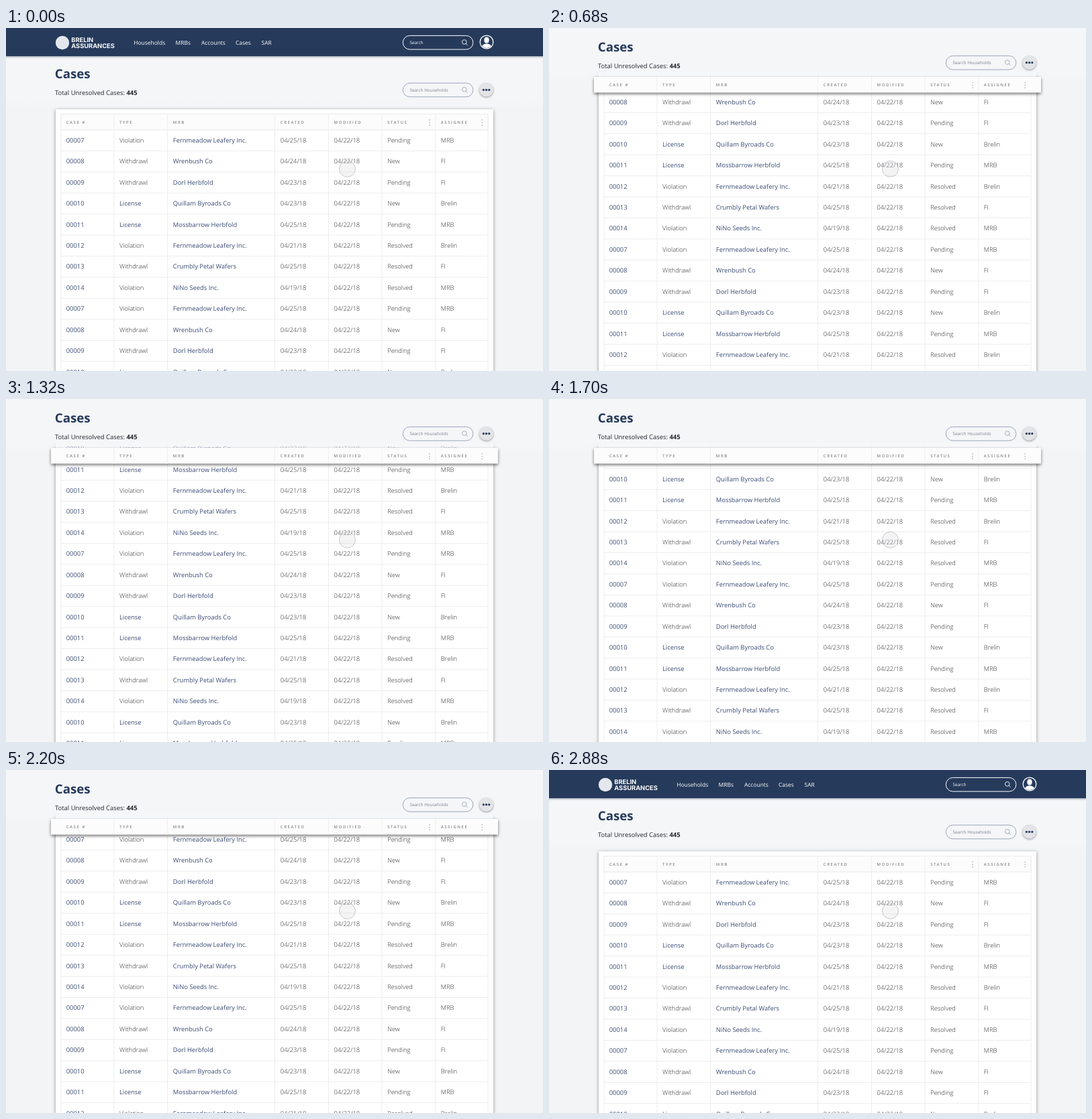
An HTML page that plays this animation: 800 by 512 pixels, repeating every 2900 ms.

```html
<!DOCTYPE html>
<html lang="en">
<head>
<meta charset="utf-8">
<title>Cases</title>
<style>
  html, body { margin: 0; width: 100%; height: 100%; overflow: hidden; background: #f2f4f6; }
  svg { display: block; width: 800px; height: 512px; }
  text { font-family: "Open Sans", "Noto Sans", sans-serif; text-rendering: geometricPrecision; white-space: pre; }
  .link { font-size: 9.4px; fill: #3a4c74; }
  .cell { font-size: 9.4px; font-weight: 300; fill: #26272c; }
  .head { font-size: 6px; font-weight: 600; letter-spacing: 1.55px; fill: #85878d; }
  .menu { font-size: 8.45px; fill: #fff; }
  .hint { font-size: 6.4px; }
  .brand { font: 700 9.3px Inter, sans-serif; fill: #fff; }
  .title { font-size: 18.7px; font-weight: 700; fill: #263a5b; }
  .total { font-size: 9.43px; fill: #25272e; }
  .card { filter: drop-shadow(0 1px 2.5px rgba(0, 0, 0, .42)); }
  .bar { filter: drop-shadow(0 1px 1.5px rgba(30, 45, 75, .5)); }
  .knob { filter: drop-shadow(0 1px 1.5px rgba(0, 0, 0, .4)); }
</style>
</head>
<body>
<svg viewBox="0 0 800 512" xmlns="http://www.w3.org/2000/svg">
  <defs>
    <linearGradient id="fade" x1="0" y1="0" x2="0" y2="1">
      <stop offset="0" stop-color="#f4f6f8"/>
      <stop offset="1" stop-color="#f4f6f8" stop-opacity="0"/>
    </linearGradient>
    <clipPath id="face"><circle cx="716" cy="21" r="9"/></clipPath>
  </defs>
  <rect width="800" height="512" fill="#f2f4f6"/>
  <g id="table"></g>
  <g id="top"></g>
  <g id="header"></g>
  <g id="nav"></g>
  <circle cx="508.5" cy="210.3" r="12" fill="#d8d8dc" fill-opacity=".28" stroke="#8f9096" stroke-opacity=".45"/>
</svg>
<script>
const LOOP = 2900, STEP = 20;
const ROW_H = 31.43, ROWS_TOP = 152, HEAD_TOP = 128.5, HEAD_H = 23.5;
const STICK = 55.5;      // scroll at which the column header sticks
const COLLAPSE = 42;     // scroll at which the page top stops moving

const EDGES = [82, 161, 240.5, 400.5, 480.5, 560, 640, 718];
const TEXT_X = [89.7, 169, 248.8, 408.8, 488.6, 568.2, 647.8];
const HEADS = ['CASE #', 'TYPE', 'MRB', 'CREATED', 'MODIFIED', 'STATUS', 'ASSIGNEE'];
const CASES = [
  ['00007', 'Violation', 'Fernmeadow Leafery Inc.', 25, 'Pending', 'MRB'],
  ['00008', 'Withdrawl', 'Wrenbush Co', 24, 'New', 'FI'],
  ['00009', 'Withdrawl', 'Dorl Herbfold', 23, 'Pending', 'FI'],
  ['00010', 'License', 'Quillam Byroads Co', 23, 'New', 'Brelin'],
  ['00011', 'License', 'Mossbarrow Herbfold', 25, 'Pending', 'MRB'],
  ['00012', 'Violation', 'Fernmeadow Leafery Inc.', 21, 'Resolved', 'Brelin'],
  ['00013', 'Withdrawl', 'Crumbly Petal Wafers', 25, 'Resolved', 'FI'],
  ['00014', 'Violation', 'NiNo Seeds Inc.', 19, 'Resolved', 'MRB']
];
// [ms, scroll]
const SCROLL = [[0, 0], [300, 32], [680, 88.5], [1320, 188], [1375, 192],
                [1700, 142.5], [2200, 63.9], [2700, 0], [2900, 0]];

const $ = id => document.getElementById(id);
const clamp = v => Math.min(1, Math.max(0, v));
const text = (x, y, cls, s, more = '') => `<text x="${x}" y="${y}" class="${cls}" ${more}>${s}</text>`;
const line = (x1, y1, x2, y2, color) =>
  `<path d="M${x1} ${y1}L${x2} ${y2}" stroke="${color}" stroke-width="1"/>`;
const dot = (x, y, r, color) => `<circle cx="${x}" cy="${y}" r="${r}" fill="${color}"/>`;

function searchBox(y, label, stroke, ink) {
  const c = y + 10.3;
  return `<rect x="591.3" y="${y}" width="104.6" height="20.6" rx="10.3" fill="none" stroke="${stroke}"/>` +
    text(601.4, c + 2.4, 'hint', label, `fill="${ink}"`) +
    `<g fill="none" stroke="${stroke}" stroke-width=".9"><circle cx="682.8" cy="${c - .8}" r="3.3"/>` +
    `<path d="M685.2 ${c + 1.6}l2.6 2.6"/></g>`;
}

function buildTable() {
  let s = '<rect class="card" x="74" y="121.3" width="652" height="640" fill="#fff"/>';
  for (let i = 0; i < 19; i++) {
    const row = CASES[i < 16 ? i % 8 : i - 13];
    const y = ROWS_TOP + i * ROW_H;
    const base = y + 18.9;
    const [id, type, name, day, status, owner] = row;
    const cells = [id, type, name, `04/${day}/18`, '04/22/18', status, owner];
    s += line(82, y, 718, y, '#ededef');
    cells.forEach((c, k) => {
      const link = k === 0 || k === 2 || c === 'License';
      s += text(TEXT_X[k], base, link ? 'link' : 'cell', c);
    });
  }
  EDGES.forEach(x => s += line(x, HEAD_TOP, x, 760, '#ededef'));
  $('table').innerHTML = s;
}

function buildHeader() {
  let s = `<rect id="plate" y="${HEAD_TOP}" height="${HEAD_H}" fill="#fcfcfc"/><g id="frame">` +
    `<rect x="82" y="${HEAD_TOP}" width="636" height="${HEAD_H}" fill="none" stroke="#ebebed"/></g>`;
  EDGES.slice(1, -1).forEach(x => s += line(x, HEAD_TOP, x, HEAD_TOP + HEAD_H, '#efeff0'));
  HEADS.forEach((h, i) => s += text(TEXT_X[i], 142.7, 'head', h));
  for (const x of [631, 709.3])
    for (const y of [137.3, 141, 144.7]) s += dot(x, y, .8, '#a3a4a9');
  $('header').innerHTML = s;
}

function buildTop() {
  $('top').innerHTML =
    '<rect y="-10" width="800" height="117" fill="#f4f6f8"/>' +
    '<rect y="107" width="800" height="14" fill="url(#fade)"/>' +
    text(72.8, 75.2, 'title', 'Cases') +
    text(73, 100.3, 'total', 'Total Unresolved Cases: <tspan font-weight="700">445</tspan>') +
    searchBox(82.2, 'Search Households', '#9ba6ba', '#7d828e') +
    '<circle class="knob" cx="715.6" cy="92.3" r="10.3" fill="#e3e4e7"/>' +
    [711.4, 715.6, 719.8].map(x => dot(x, 92.3, 1.6, '#263a5b')).join('');
}

function buildNav() {
  const items = [[190.3, 'Households'], [252.6, 'MRBs'], [291, 'Accounts'], [342, 'Cases'], [380.5, 'SAR']];
  $('nav').innerHTML =
    '<rect class="bar" x="-5" y="-10" width="810" height="52" fill="#263a5b"/>' +
    dot(84, 22, 10.2, '#e4e8ee') +
    text(97.3, 20.6, 'brand', 'BRELIN') + text(97.3, 30, 'brand', 'ASSURANCES') +
    items.map(([x, s]) => text(x, 25.3, 'menu', s)).join('') +
    searchBox(11.4, 'Search', '#fff', '#fff') +
    dot(716, 21, 10.5, '#fff') + dot(716, 21, 9.2, '#263a5b') +
    '<g clip-path="url(#face)" fill="#fff"><ellipse cx="716" cy="18" rx="3.7" ry="4.5"/>' +
    '<ellipse cx="716" cy="28.6" rx="7.2" ry="5.4"/></g>';
}

// Smooth curve through the scroll points, flat at both ends and at turning points
function slope(i) {
  const a = SCROLL[i - 1], b = SCROLL[i], c = SCROLL[i + 1];
  if (!a || !c || (b[1] - a[1]) * (c[1] - b[1]) <= 0) return 0;
  return (c[1] - a[1]) / (c[0] - a[0]);
}

function scrollAt(t) {
  let i = 0;
  while (t > SCROLL[i + 1][0]) i++;
  const [t0, a] = SCROLL[i], [t1, b] = SCROLL[i + 1];
  const d = t1 - t0, u = (t - t0) / d, v = 1 - u;
  return v * v * (1 + 2 * u) * a + u * u * (3 - 2 * u) * b +
         d * u * v * (v * slope(i) - u * slope(i + 1));
}

const shift = (el, y) => el.setAttribute('transform', `translate(0 ${y.toFixed(2)})`);

function draw(t) {
  const y = scrollAt(t);
  const collapse = clamp(y / COLLAPSE);
  const lift = clamp((y - 44) / (STICK - 44));
  shift($('table'), -y);
  shift($('header'), -Math.min(y, STICK));
  shift($('top'), -40.6 * collapse);
  shift($('nav'), -46.2 * collapse);
  const plate = $('plate');
  plate.setAttribute('x', 82 - 15 * lift);
  plate.setAttribute('width', 636 + 30 * lift);
  plate.style.filter = lift ? `drop-shadow(0 2px 2px rgba(0,0,0,${(.55 * lift).toFixed(3)}))` : 'none';
  $('frame').setAttribute('opacity', 1 - lift);
}

buildTable();
buildHeader();
buildTop();
buildNav();

const start = performance.now();
function tick() {
  const t = (performance.now() - start) % LOOP;
  draw(Math.floor(t / STEP) * STEP);
  requestAnimationFrame(tick);
}
tick();
</script>
</body>
</html>
```
